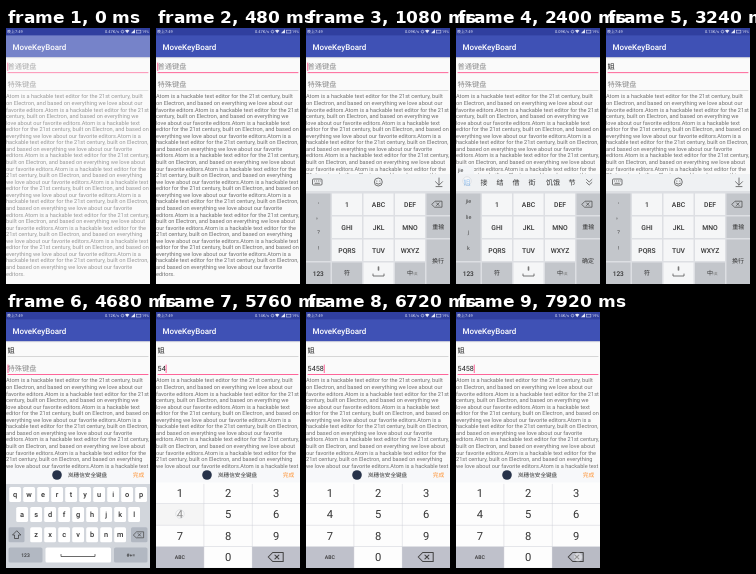
An HTML page that plays this animation: 144x256 px, repeating every 8 s.

```html
<!DOCTYPE html>
<html lang="zh">
<head>
<meta charset="utf-8">
<title>MoveKeyBoard</title>
<style>
html, body { margin: 0; width: 100%; height: 100%; overflow: hidden; background: #fafafa; }
svg { display: block; width: 100%; height: 100%; text-rendering: geometricPrecision; }
text, p { font-family: Roboto, "Noto Sans CJK SC", "Noto Sans CJK", sans-serif; }
p { margin: 0; width: 144px; font-size: 5.6px; line-height: 6.56px; color: #707070; }
</style>
</head>
<body>
<svg id="stage" viewBox="0 0 144 256" xmlns="http://www.w3.org/2000/svg"></svg>
<script>
const LOOP = 8000;
const PINK = '#ff4081';
const stage = document.getElementById('stage');

const rect = (x, y, w, h, fill, more = '') =>
  `<rect x="${x}" y="${y}" width="${w}" height="${h}" fill="${fill}" ${more}/>`;
const line = (d, color = '#444', w = 0.8) =>
  `<path d="${d}" fill="none" stroke="${color}" stroke-width="${w}" stroke-linecap="round" stroke-linejoin="round"/>`;
// cy is the visual middle of the glyphs
const text = (s, x, cy, size, fill = '#333', more = 'text-anchor="middle"') =>
  `<text x="${x}" y="${cy + size * 0.36}" font-size="${size}" fill="${fill}" ${more}>${s}</text>`;
const left = (s, x, cy, size, fill, id = '') => text(s, x, cy, size, fill, id && `id="${id}"`);

const keys = { pinyin: [], qwerty: [], digits: [] };
function key(board, x, y, w, h, fill, label = '', size = 6.5, r = 0, weight = 500) {
  keys[board].push({ x, y, w, h, r });
  return rect(x, y, w, h, fill, `rx="${r}"`) +
    (label && text(label, x + w / 2, y + h / 2, size, '#333', `text-anchor="middle" font-weight="${weight}"`));
}
const backspace = (x, y, k = 1) =>
  `<g transform="translate(${x} ${y}) scale(${k})">` +
  line('M-5 0l3-3h7v6h-7zM-.5-1.3l2.6 2.6m0-2.6l-2.6 2.6', '#444', 0.7) + '</g>';

function statusBar() {
  return rect(0, 0, 144, 7.4, '#303f9f') +
    left('晚上7:49', 1, 3.6, 4, '#dfe3f5') +
    left('', 99, 3.6, 4, '#dfe3f5', 'speed') +
    '<circle cx="116.5" cy="3.6" r="1.3" fill="none" stroke="#dfe3f5" stroke-width=".6"/>' +
    '<path d="M119 2.5q2.2-1.6 4.4 0l-2.2 2.8zM125 5.3h4v-4z" fill="#dfe3f5"/>' +
    rect(130.5, 2.2, 4.4, 2.8, 'none', 'stroke="#dfe3f5" stroke-width=".5"') +
    left('19%', 136, 3.6, 3.8, '#dfe3f5');
}

function page() {
  const sentence = 'Atom is a hackable text editor for the 21st century, built on Electron, ' +
    'and based on everything we love about our favorite editors.';
  return rect(0, 0, 144, 256, '#fafafa') + rect(0, 7, 144, 22.4, '#3f51b5') +
    rect(0, 29.4, 144, 0.8, '#d4d5da') +
    text('MoveKeyBoard', 6.4, 18.7, 8, '#fff', 'font-weight="500"') + statusBar() +
    left('', 1.6, 38.6, 7.2, '#888', 'first') + left('', 1.6, 56.7, 7.2, '#888', 'second') +
    rect(1.6, 44.3, 140.8, 0.8, '#999', 'id="rule1"') +
    rect(1.6, 62, 140.8, 0.8, '#999', 'id="rule2"') +
    rect(1.6, 35, 0.8, 8.4, PINK, 'id="caret"') +
    `<foreignObject x="0" y="66.4" width="144" height="189"><p>${sentence.repeat(12)}</p></foreignObject>`;
}

function pinyinBoard() {
  const light = '#f5f6f7', dark = '#c3c6cb', b = 'pinyin';
  const rows = [165.5, 188.5, 211.5, 234.5], cols = [26, 57.5, 89];
  const labels = ['1', 'ABC', 'DEF', 'GHI', 'JKL', 'MNO', 'PQRS', 'TUV', 'WXYZ', '符', '', '中'];
  let s = rect(0, 146, 144, 110, '#dddfe3') + rect(0, 146, 144, 17, '#eff1f3');
  s += '<g id="tools">' +
    rect(6.5, 151, 9.5, 6, 'none', 'rx="1" stroke="#555" stroke-width=".8"') +
    line('M8.5 153h.2m1.8 0h.2m1.8 0h.2m1.4 0h.2M9 155.3h4.5', '#555') +
    '<circle cx="72.3" cy="154" r="4" fill="none" stroke="#555" stroke-width=".8"/>' +
    line('M70.8 153v.2m3-.2v.2M70 155.3q2.3 2 4.6 0', '#555') +
    line('M133 150v7m-3.5-3.3l3.5 3.5 3.5-3.5M130 158.6h6', '#555') + '</g>';
  s += '<g id="words">';
  for (let i = 0; i < 7; i++) s += text('', 0, 154, 7, '#333', 'class="word" text-anchor="middle"');
  s += line('M130.5 151.5l2.7 2.5 2.7-2.5m-5.4 3l2.7 2.5 2.7-2.5', '#555') + '</g>';
  s += key(b, 0, rows[0], 24.5, 67.5, dark) + key(b, 0, rows[3], 24.5, 21.5, dark, '123');
  for (let i = 0; i < 4; i++) s += text('', 12.5, 173 + i * 15.7, 5.5, '#444', 'class="side" text-anchor="middle"');
  labels.forEach((name, i) => {
    s += key(b, cols[i % 3], rows[i / 3 | 0], 30, 21.5, i > 8 && i !== 10 ? dark : light, name, i > 8 ? 6 : 6.8);
  });
  s += text('/英', 109, 246, 3.6, '#777') + line('M67 246v2h11v-2', '#555') +
    line('M72.5 239v3', '#777', 1.6);
  s += key(b, 120.5, rows[0], 23.5, 21.5, dark) + backspace(131, 176.2) +
    key(b, 120.5, rows[1], 23.5, 21.5, dark, '重输', 6) +
    key(b, 120.5, rows[2], 23.5, 44.5, dark) + text('', 132, 233, 6, '#333', 'id="enter" text-anchor="middle"');
  return s + `<g id="compose">${rect(0, 137.5, 18, 8.5, '#f3f5f7')}${left('', 2, 141.7, 5.4, '#444', 'letters')}</g>`;
}

function safeBar() {
  return rect(0, 156, 144, 16, '#f7f8fa') + '<circle cx="51" cy="163" r="4.8" fill="#27334a"/>' +
    left('岚穗信安全键盘', 62, 163, 5.6, '#333') + text('完成', 132.5, 163, 5.8, '#ff9436');
}

function qwertyBoard() {
  const dark = '#b2b8c2', b = 'qwerty';
  let s = rect(0, 156, 144, 100, '#d2d6dc') + safeBar();
  [['qwertyuiop', 3.2, 175], ['asdfghjkl', 10.2, 195], ['zxcvbnm', 24.2, 215.3]].forEach(([row, x, y]) => {
    [...row].forEach((c, i) => { s += key(b, x + i * 14, y, 11.8, 15, '#fff', c, 7.4, 1.6); });
  });
  s += key(b, 2.5, 215.3, 16, 15, dark, '', 6, 1.6) +
    line('M10.5 219l-4 4h2v3.5h4v-3.5h2z', '#333', 0.7) +
    key(b, 125, 215.3, 16.5, 15, dark, '', 6, 1.6) + backspace(132.6, 222.8) +
    key(b, 2.5, 235.5, 34, 15, dark, '123', 5, 1.6) +
    key(b, 39.5, 235.5, 65.5, 15, '#fff', '', 5, 1.6) + line('M55 242.5v2h34v-2', '#444') +
    key(b, 108, 235.5, 33.5, 15, dark, '#+=', 5, 1.6);
  return s;
}

function digitBoard() {
  let s = rect(0, 156, 144, 100, '#cfd1d8') + safeBar();
  ['1', '2', '3', '4', '5', '6', '7', '8', '9', 'ABC', '0', ''].forEach((c, i) => {
    const side = i === 9 || i === 11;
    s += key('digits', i % 3 * 48.2, 170.4 + (i / 3 | 0) * 21.5, 47.7, 21,
      side ? '#bfc1cb' : '#fdfdfd', c, side ? 5.2 : 11.2, 0, side ? 500 : 400);
  });
  return s + backspace(119.7, 245, 1.5);
}

stage.innerHTML = page() +
  `<g id="pinyin">${pinyinBoard()}</g><g id="qwerty">${qwertyBoard()}</g><g id="digits">${digitBoard()}</g>` +
  rect(0, 0, 0, 0, '#000', 'id="press" opacity=".03"') +
  '<circle id="touch" r="4.2" fill="#fff" fill-opacity=".45" stroke="#b9bec8" stroke-opacity=".6" stroke-width=".6"/>' +
  rect(0, 7.4, 144, 248.6, '#f8f8f8', 'id="veil"');

const $ = id => document.getElementById(id);
const show = (id, on) => $(id).setAttribute('display', on ? 'inline' : 'none');
const set = (id, o) => { for (const k in o) $(id).setAttribute(k, o[k]); };
const write = (el, s) => { if (el.textContent !== s) el.textContent = s; };
const at = (steps, t) => steps.reduce((v, s) => t >= s[0] ? s : v);
const ease = (t, a, b) => {
  const p = Math.min(1, Math.max(0, (t - a) / (b - a)));
  return 1 - (1 - p) ** 3;
};

// start, end, x, y
const touches = [
  [560, 680, 40, 39], [1320, 1440, 72, 199], [1620, 1740, 41, 199], [1900, 2020, 104, 176],
  [2340, 2560, 11, 153], [3360, 3480, 104, 199], [4130, 4310, 14, 53], [4860, 4990, 19, 243],
  [5280, 5400, 72, 202], [5640, 5800, 24, 202], [6000, 6120, 72, 202], [6360, 6480, 72, 224],
  [6960, 7080, 72, 181], [7200, 7320, 120, 202], [7500, 7620, 122, 245], [7800, 8000, 122, 245]
];
const speeds = [[0, '0.47K/s'], [600, '0.09K/s'], [2600, '0.13K/s'], [4000, '0.12K/s'], [5400, '0.14K/s']];
// start, composed letters, candidates, side column
const idle = ['', '', ', 。 ? !'];
const inputs = [
  [0, ...idle],
  [1320, 'j', '就 将 看 来 了 啦', 'j k l 5'],
  [1620, 'ji', '机 级 几 及 里 理', 'ji li j k'],
  [1900, 'jie', '姐 接 结 借 街 饥饿 节', 'jie lie j k'],
  [2560, ...idle],
  [3360, '', '6 66 6年 6米 6秒 6名', 'o m n 6'],
  [4320, ...idle]
];
const wordX = { 姐: [11, 28, 44, 60, 76, 97, 116], 6: [9, 26, 45, 66, 86, 107], other: [11, 28, 44, 60, 76, 92] };
const codes = [
  [0, ''], [5280, '5'], [5640, '54'], [6000, '545'], [6360, '5458'],
  [6960, '54582'], [7200, '545826'], [7500, '54582'], [7800, '5458']
];
const edits = [0, 640, 2560, 4320, ...codes.slice(1).map(c => c[0])].map(v => [v]);

function drawFields(t) {
  const name = t >= 2560 ? '姐' : '', code = at(codes, t)[1], second = t >= 4320;
  write($('first'), name || '普通键盘');
  write($('second'), code || '特殊键盘');
  set('first', { fill: name ? '#222' : '#8c8c8c' });
  set('second', { fill: code ? '#222' : '#8c8c8c' });
  set('rule1', { fill: second ? '#a0a0a0' : PINK, height: second ? 0.4 : 0.8 });
  set('rule2', { fill: second ? PINK : '#a0a0a0', height: second ? 0.8 : 0.4 });
  const x = second ? 1.6 + code.length * 4.05 : name ? 9 : 1.4;
  set('caret', { x, y: second ? 52.6 : 34.6 });
  show('caret', (t - at(edits, t)[0]) % 1000 < 500);
}

function drawPinyin(t) {
  const [, letters, words, side] = at(inputs, t);
  const list = words ? words.split(' ') : [], xs = wordX[list[0]] || wordX.other;
  show('tools', !words);
  show('words', words);
  show('compose', letters);
  write($('letters'), letters);
  write($('enter'), words ? '确定' : '换行');
  document.querySelectorAll('.word').forEach((el, i) => {
    write(el, list[i] || '');
    el.setAttribute('x', xs[i] || 0);
    el.setAttribute('fill', i ? '#333' : '#3f8fe0');
  });
  document.querySelectorAll('.side').forEach((el, i) => write(el, side.split(' ')[i]));
}

function drawTouch(t, board) {
  const hit = touches.find(h => t >= h[0] && t < h[1]);
  show('touch', hit);
  show('press', false);
  if (!hit) return;
  const [, , x, y] = hit;
  set('touch', { cx: x, cy: y });
  const k = keys[board].find(k => x >= k.x && x < k.x + k.w && y >= k.y && y < k.y + k.h);
  if (!k) return;
  set('press', { x: k.x, y: k.y, width: k.w, height: k.h, rx: k.r });
  show('press', true);
}

function draw(t) {
  const board = t < 4440 ? 'pinyin' : t < 4960 ? 'qwerty' : 'digits';
  for (const id in keys) show(id, id === board && t >= 680);
  const drop = 120 * (1 - ease(t, 680, 880) + ease(t, 4320, 4440));
  set('pinyin', { transform: `translate(0 ${drop})` });
  set('qwerty', { transform: `translate(0 ${100 * (1 - ease(t, 4440, 4620))})` });
  set('veil', { opacity: 0.3 * Math.max(0, 1 - t / 360) });
  write($('speed'), at(speeds, t)[1]);
  drawFields(t);
  drawPinyin(t);
  drawTouch(t, board);
}

function tick() {
  draw(performance.now() % LOOP);
  requestAnimationFrame(tick);
}
tick();
</script>
</body>
</html>
```
